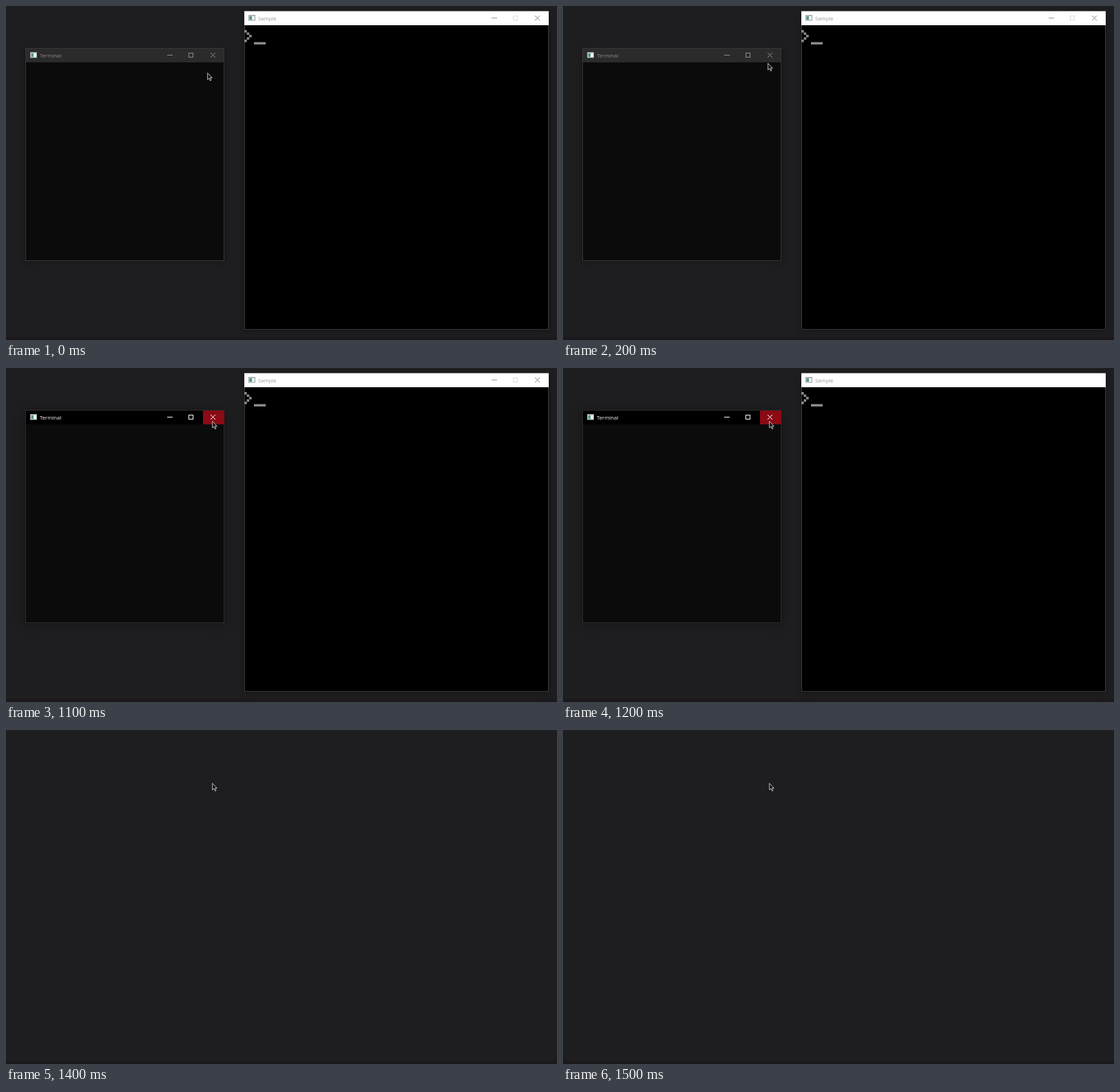
Write an HTML page with a canvas that moves like this. It is 800 px wide and 486 px high and loops after 2500 ms.

```html
<!DOCTYPE html>
<html lang="en">
<head>
<meta charset="utf-8">
<title>Closing windows</title>
<style>
  html, body { margin: 0; width: 800px; height: 486px; overflow: hidden; background: #1e1e20; }
  canvas { display: block; }
</style>
</head>
<body>
<canvas id="stage" width="800" height="486"></canvas>
<script>
const ctx = document.getElementById('stage').getContext('2d');
const LOOP = 2500, STEP = 100;
const arrow = new Path2D('M0 0V9.6L2.2 7.6L3.8 11.2L5.3 10.5L3.8 7.1H6.6Z');

function rect(color, x, y, w, h) {
  ctx.fillStyle = color;
  ctx.fillRect(x, y, w, h);
}

function frame(color, x, y, w, h) {
  ctx.strokeStyle = color;
  ctx.lineWidth = 1;
  ctx.strokeRect(x + 0.5, y + 0.5, w - 1, h - 1);
}

function shadowBox(x, y, w, h, blur) {
  ctx.save();
  ctx.shadowColor = 'rgba(0,0,0,0.35)';
  ctx.shadowBlur = blur;
  ctx.shadowOffsetY = 2;
  rect('#000', x, y, w, h);
  ctx.restore();
}

function title(text, color, x, y) {
  ctx.font = '7.7px "Open Sans", "Noto Sans", sans-serif';
  ctx.fillStyle = color;
  ctx.fillText(text, x, y);
}

function icon(x, y) {
  rect('#9aa3a6', x, y, 10, 8.5);
  rect('#eef1f1', x + 1, y + 1.5, 8, 6);
  rect('#4f9484', x + 1.5, y + 2, 3.5, 5);
}

function minimize(color, x, y) {
  rect(color, x - 4, y, 8, 1);
}

function maximize(color, x, y) {
  frame(color, x - 3, y - 3, 7, 7);
}

function cross(color, x, y) {
  ctx.strokeStyle = color;
  ctx.lineWidth = 1;
  ctx.beginPath();
  ctx.moveTo(x - 3.5, y - 3.5);
  ctx.lineTo(x + 3.5, y + 3.5);
  ctx.moveTo(x + 3.5, y - 3.5);
  ctx.lineTo(x - 3.5, y + 3.5);
  ctx.stroke();
}

function terminal(active, hover) {
  const ink = active ? '#fff' : '#8c8c8c';
  shadowBox(28, 61, 289, 309, active ? 16 : 8);
  rect('#0b0b0b', 28, 61, 289, 309);
  rect(active ? '#000' : '#2b2b2b', 28, 61, 289, 21);
  frame(active ? '#2a2a2b' : '#363637', 28, 61, 289, 310);
  icon(35, 67);
  title('Terminal', ink, 49, 74.5);
  minimize(ink, 238, 71);
  maximize(ink, 268, 71);
  if (hover) rect(active ? '#8b0a14' : '#e81123', 286, 62, 31, 20);
  cross(hover ? '#fff' : ink, 300.5, 71.5);
}

function sample(buttons) {
  shadowBox(346, 8, 442, 463, 8);
  rect('#000', 346, 8, 442, 463);
  frame('#39393a', 346, 8, 442, 463);
  rect('#fff', 346, 7.5, 442, 20.5);
  icon(352, 13);
  title('Sample', '#999', 366, 20.5);
  if (buttons) {
    minimize('#999', 709, 17);
    maximize('#ddd', 739, 17);
    cross('#888', 771.5, 17.5);
  }
  for (let row = 0; row < 5; row++) {
    rect('#8a8a8a', 346 + 3.5 * (2 - Math.abs(row - 2)), 35 + 3.5 * row, 3.7, 3.6);
  }
  rect('#8a8a8a', 360, 52.5, 17, 3.5);
}

function fadingSample() {
  ctx.save();
  ctx.translate(566, 229);
  ctx.scale(0.979, 0.979);
  ctx.translate(-566, -229);
  sample(false);
  ctx.restore();
  // a veil in the desktop colour fades the window as one layer
  rect('rgba(30,30,32,0.45)', 330, 0, 470, 482);
}

function pointer(x, y) {
  ctx.save();
  ctx.translate(x, y);
  ctx.strokeStyle = '#e8e8e8';
  ctx.fillStyle = '#111';
  ctx.lineWidth = 0.8;
  ctx.fill(arrow);
  ctx.stroke(arrow);
  ctx.restore();
}

function draw(t) {
  const move = Math.sin(Math.min(t / 400, 1) * Math.PI / 2);
  const tipY = 97.5 - 20 * move;

  rect('#1e1e20', 0, 0, 800, 486);
  rect('#1a181b', 0, 482, 800, 4);

  if (t < 1300) {
    terminal(t >= 1100, tipY < 82);
    sample(t < 1200);
  } else if (t < 1400) {
    fadingSample();
  }
  pointer(292.7 + 7 * move, tipY);
}

function tick() {
  const t = performance.now() % LOOP;
  draw(Math.floor(t / STEP) * STEP);
  requestAnimationFrame(tick);
}
tick();
</script>
</body>
</html>
```
